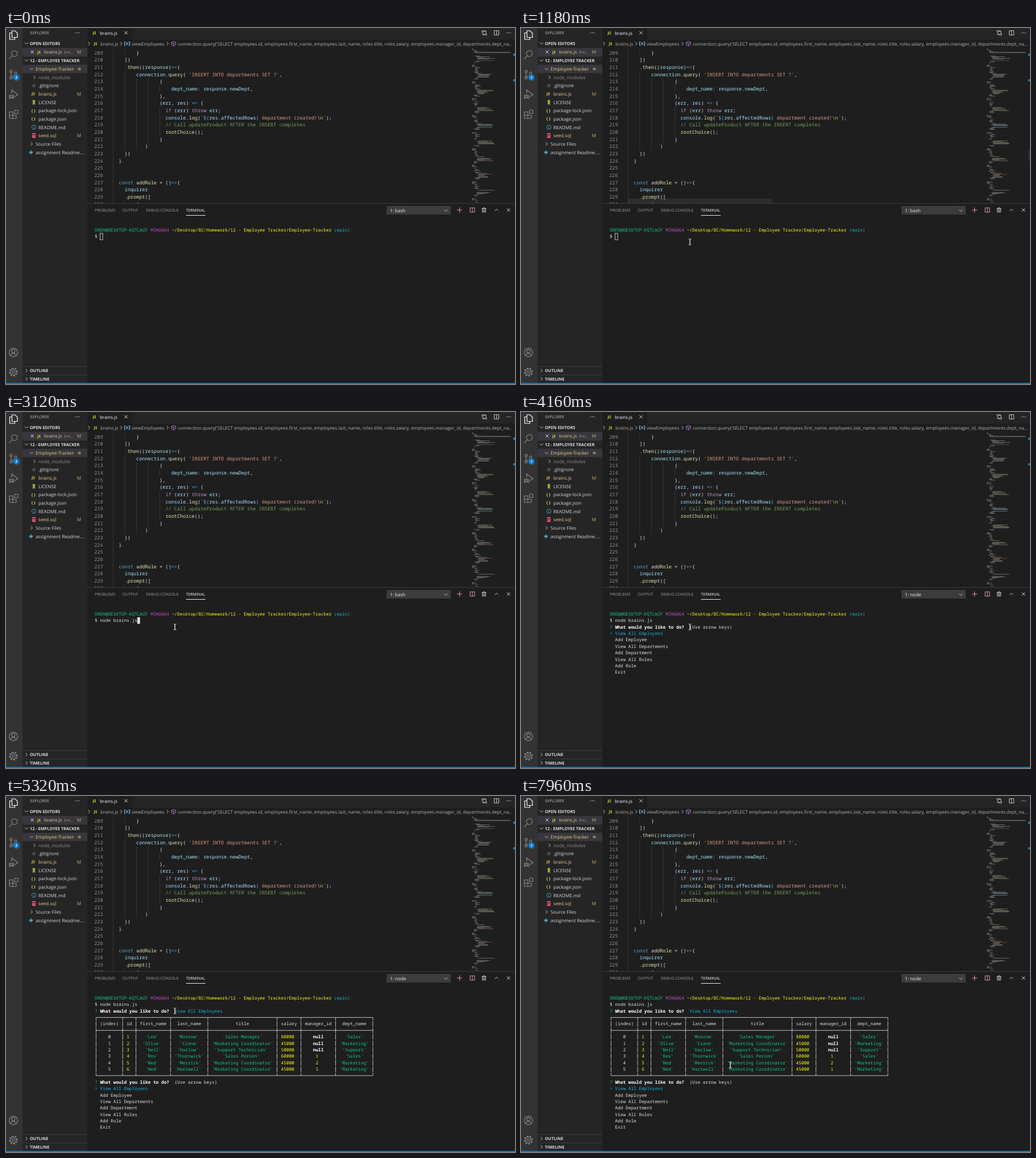
An HTML page that plays this animation: 895 by 626 pixels, repeating every 8 s.

```html
<!DOCTYPE html>
<html lang="en">
<head>
<meta charset="utf-8">
<title>Employee Tracker</title>
<style>
html, body { margin: 0; width: 100%; height: 100%; overflow: hidden; background: #1e1e1e; }
svg { display: block; width: 100%; height: 100%; }
text { font-family: "Open Sans", "Noto Sans", sans-serif; white-space: pre; text-rendering: geometricPrecision; }
.mono { font-family: "Noto Sans Mono", "DejaVu Sans Mono", monospace; font-weight: 500; }
</style>
</head>
<body>
<svg id="stage" viewBox="0 0 895 626"></svg>
<script>
const stage = document.getElementById('stage');

// One-letter colour keys for coloured runs of text: "bname|d(" and so on
const C = {
  d: '#dcdcdc', b: '#a4e2ff', y: '#e4e4b2', o: '#d89a80', k: '#5aa4e0', p: '#cd8cc6', c: '#6fa05a', e: '#dfc285',
  T: '#e0e0e0', G: '#0fcb83', M: '#cc44cc', Y: '#fafa14', A: '#14b4e0', W: '#ffffff'
};
const text = (x, y, s, size, fill = '#d6d6d6', more = '') =>
  `<text x="${x}" y="${y}" font-size="${size}" fill="${fill}" ${more}>${s}</text>`;
const rect = (x, y, w, h, fill, more = '') =>
  `<rect x="${x}" y="${y}" width="${w}" height="${h}" fill="${fill}" ${more}/>`;
const dot = (x, y, r, fill) => `<circle cx="${x}" cy="${y}" r="${r}" fill="${fill}"/>`;
const icon = (x, y, d, color = '#c5c5c5', w = 1, more = '') =>
  `<path transform="translate(${x} ${y})" d="${d}" fill="none" stroke="${color}" stroke-width="${w}" ${more}/>`;
const group = (id, s) => `<g id="${id}" display="none">${s}</g>`;
const spans = s => s.split('|').map(p =>
  `<tspan fill="${C[p[0]]}"${p[0] === 'W' ? ' font-weight="700"' : ''}>${p.slice(1)}</tspan>`).join('');

const bold = 'font-weight="700"', mono = 'class="mono"';
const ring = (r, cx = 0, cy = 0) => `M${cx - r} ${cy}a${r} ${r} 0 1 0 ${2 * r} 0a${r} ${r} 0 1 0 ${-2 * r} 0`;
const down = (x, y) => icon(x, y, 'M-3-1.5 0 1.5 3-1.5');
const right = (x, y) => icon(x, y, 'M-1.5-3 1.5 0-1.5 3');
const cross = (x, y) => icon(x, y, 'M-2.7-2.7 2.7 2.7M2.7-2.7-2.7 2.7', '#e0e0e0');
const split = (x, y, color) => icon(x, y, 'M-4-3.8h8v7.6h-8zM0-3.8v7.6', color);
const dots = (x, y) => [-3, 0, 3].map(i => dot(x + i, y, .8, '#c5c5c5')).join('');
const js = (x, y) => text(x, y + 2.5, 'JS', 6.6, '#e0dc3c', bold);

function activityBar() {
  const g = '#858585', w = 1.2;
  return rect(0, 0, 29, 626, '#333333')
    + icon(13, 12.5, 'M-2.5-7.5h5.5l4 4v7.5h-9.5zM-2.5-4h-4v11.5h9v-4', '#fff', w)
    + icon(13, 47, ring(5.2, 1.8, -2) + 'M-2 2-7.5 7.5', g, w)
    + icon(12.5, 82, ring(2.2, -3.5, -5.5) + ring(2.2, -3.5, 5.5) + ring(2.2, 4.5, -2.5) + 'M-3.5-3v6M4.5 0q0 3-7 3', g, w)
    + dot(18.3, 87, 5.6, '#007acc') + text(16.5, 89.3, '2', 6.2, '#fff', bold)
    + icon(13, 117, 'M-3-2v-6L8 0 0 5.5' + ring(2.9, -3.5, 3.8) + 'M-8 1l2 1.5M1 1l-2 1.5M-8 7.5l2-1.5M1 7.5l-2-1.5M-8 4h7.5', g, w)
    + icon(13, 152, 'M-7-4.5h6v11.5h-6zM-7 1.5h12v5.5h-12zM2-7.5h6v6h-6z', g, w)
    + icon(13, 570.5, ring(7.4) + ring(2.8, 0, -2) + 'M-5 5.3q5-8 10 0', g, w)
    + icon(13, 605, ring(2.2) + ring(5.4), g, w)
    + icon(13, 605, ring(6.8), g, 2, 'stroke-dasharray="2.67"');
}

function sideBar() {
  const mod = '#ebc88a', blue = '#519aba';
  const rowY = i => 72 + i * 14.65;
  const label = (i, x, s, fill) => text(x, rowY(i) + 3, s, 8.2, fill);
  const changed = y => text(124.7, y + 3, 'M', 8.2, '#cfab73');
  const head = (y, s, arrow) => arrow(36, y) + text(42, y + 2.7, s, 7.35, '#dcdcdc', bold);
  const braces = i => text(44.5, rowY(i) + 2.4, '{ }', 7, '#d8d842', bold);
  let s = rect(29, 0, 114, 626, '#252526') + text(42.5, 11, 'EXPLORER', 6.95, '#c4c4c4') + dots(125.5, 8.5)
    + rect(29, 34.9, 114, 14.6, '#37373d') + rect(29, 64.7, 114, 14.6, '#37373d');
  for (const y of [49.5, 595, 609.6]) s += rect(29, y, 114, .7, '#47474a');
  s += head(27, 'OPEN EDITORS', down) + head(57, '12 - EMPLOYEE TRACKER', down)
    + head(602.5, 'OUTLINE', right) + head(617, 'TIMELINE', right);
  s += cross(46, 42) + js(55, 42) + text(67, 45, 'brains.js', 8.05, mod) + text(102, 45, 'Em...', 7.3, '#a89270') + changed(42);
  return s + down(45, 72) + label(0, 52, 'Employee-Tracker', mod) + dot(129, 72, 2.6, '#8a7a60')
    + right(50, rowY(1)) + label(1, 57, 'node_modules', '#8c8c8c')
    + rect(46.5, rowY(2) - 2.5, 5, 5, '#41535b') + label(2, 57, '.gitignore')
    + js(45, rowY(3)) + label(3, 57, 'brains.js', mod) + changed(rowY(3))
    + icon(49, rowY(4), ring(1.5, 0, -2) + 'M-.8 0-1.5 4M.8 0 1.5 4', '#d8d842', 1.4) + label(4, 57, 'LICENSE')
    + braces(5) + label(5, 57, 'package-lock.json')
    + braces(6) + label(6, 57, 'package.json')
    + icon(49, rowY(7), ring(3.7) + 'M0-2.2v1M0-.3v2.7', blue, .9) + label(7, 57, 'README.md')
    + icon(49, rowY(8), 'M-3-2.5q3-2 6 0M-3-.2q3 1.5 6 0M-3 2.5q3 1.5 6 0', '#f55385', 2) + label(8, 57, 'seed.sql', mod) + changed(rowY(8))
    + right(45, rowY(9)) + label(9, 52, 'Source Files')
    + icon(44, rowY(10), 'M0-3.5v3.5M-2.5 0h5L0 2.5z', blue, 1.8) + label(10, 52, 'assignment Readme....');
}

// Repeating functions: a short prompt, an indented query, then closing braces and a gap
function minimap() {
  let seed = 11, s = '';
  const rnd = () => (seed = seed * 16807 % 2147483647) / 2147483647;
  const tints = ['#9cdcfe', '#d4d4d4', '#ce9178', '#dcdcaa', '#d4d4d4'];
  for (let i = 0; i < 204; i++) {
    const k = i % 22, query = k > 10 && k < 17;
    const indent = query ? 8 + 4 * rnd() : k < 3 || k > 19 ? 0 : 3 + 4 * rnd();
    const width = i === 5 || i === 6 ? 64 : query ? 8 + 22 * rnd() : 2 + 8 * rnd();
    const tint = tints[Math.floor(rnd() * 5)];
    if (k < 20 && rnd() > .12)
      s += rect((819 + indent).toFixed(1), (35.5 + i * 1.333).toFixed(1), width.toFixed(1), .8, tint, 'opacity=".5"');
  }
  return s + rect(892, 45, 3, 4, '#1b81a8') + rect(892, 90, 3, 4, '#1b81a8');
}

const lines = [
  [6, "d}"], [2, "d])"], [2, "d.|ythen|d((|bresponse|d)|k=>|d{"],
  [6, "bconnection|d.|yquery|d( |o'INSERT INTO departments SET ?'|d,"],
  [14, "d{"], [18, "bdept_name:|d |bresponse|d.|bnewDept|d,"], [14, "d},"],
  [14, "d(|berr|d, |bres|d) |k=>|d {"], [16, "pif|d (|berr|d) |pthrow|d |berr|d;"],
  [16, "bconsole|d.|ylog|d(|o`|k${|bres|d.|baffectedRows|k}|o department created!|e\\n|o`|d);"],
  [16, "c// Call updateProduct AFTER the INSERT completes"], [16, "yrootChoice|d();"],
  [14, "d}"], [9, "d)"], [2, "d})"], [0, "d}"], [0, "d"], [0, "d"],
  [0, "kconst|d |yaddRole|d = ()|k=>|d{"], [2, "binquirer"], [2, "d.|yprompt|d(["], [6, "d{"]
];

function editor() {
  const crumbs = '#b2b2b2', pitch = 12.675, adv = 5.135;
  let s = rect(143, 0, 752, 626, '#1e1e1e') + rect(222, 0, 673, 20.2, '#252526')
    + js(152.5, 8.5) + text(165, 11.5, 'brains.js', 7.9, '#fff') + cross(211, 8.5)
    + icon(841, 8.5, ring(1.4, -3, -2.8) + ring(1.4, 3, 2.8) + 'M-3-1v4h3M3 1v-4h-3M-1 1.5 .5 3-1 4.5M1-4.5-.5-3 1-1.5')
    + split(862.5, 8.5) + dots(884, 8.5);
  s += right(146, 27.5) + js(154.5, 27.5) + text(166, 30.5, 'brains.js', 8.05, crumbs) + right(202.5, 27.5)
    + icon(213, 27.5, 'M-2.5-3h-2v6h2M2.5-3h2v6h-2' + ring(1.5), '#75beff', 1.1)
    + text(221, 30.5, 'viewEmployees', 8.05, crumbs) + right(284, 27.5)
    + icon(294.5, 27.5, 'M0-4 3.8-2v4L0 4-3.8 2v-4zM-3.8-2 0 0 3.8-2M0 0v4', '#b180d7', .9)
    + text(302, 30.5, "connection.query('SELECT employees.id, employees.first_name, employees.last_name, roles.title, roles.salary, employees.manager_id, departments.dept_na...", 8.07, crumbs);
  lines.forEach(([col, code], i) => {
    const y = 46.5 + i * pitch;
    for (let c = -2; c < col || c < 0; c += 4) s += rect(198.3 + c * adv, y - 9.4, .7, pitch, '#404040');
    s += text(155.2, y, 209 + i, 8.558, '#8c8c8c', mono) + text(198.3 + col * adv, y, spans(code), 8.558, C.d, mono);
  });
  return s + minimap()
    + group('bars', rect(188, 300, 253.5, 8, '#797979', 'opacity=".55"') + rect(891.5, 214, 3.5, 19, '#797979', 'opacity=".55"'));
}

function panel() {
  const tab = (x, s, fill = '#9c9c9c') => text(x, 323, s, 7, fill);
  return rect(143, 308, 752, 318, '#1e1e1e') + rect(143, 308, 752, .8, '#444')
    + tab(156, 'PROBLEMS') + tab(205, 'OUTPUT') + tab(246, 'DEBUG CONSOLE') + tab(316.5, 'TERMINAL', '#f4f4f4')
    + rect(316.5, 329, 34.5, 1, '#e7e7e7')
    + rect(669, 313, 113, 15, '#3c3c3c') + text(675, 323.8, '', 8.2, '#f0f0f0', 'id="shell"') + down(773.5, 321)
    + icon(797.5, 320, 'M-4.5 0h9M0-4.5v9', '#e09a9a') + split(820, 320, '#d79aa2')
    + icon(840.5, 320, 'M-4-2.5h8M-1.5-2.5v-1.3h3v1.3M-2.8-2.5v6.3h5.6v-6.3M-1-1v3.5M1-1v3.5')
    + icon(862.5, 320, 'M-3 1.5 0-1.5 3 1.5') + cross(883.5, 320);
}

// Terminal grid
const ADV = 4.68, ROW = 11.37;
const colX = c => 156 + c * ADV, rowTop = r => 349.6 + r * ROW;
const term = (row, col, s, more = '') => text(colX(col), rowTop(row) + 8.4, spans(s), 7.8, C.T, mono + more);

const choices = ['View All Employees', 'Add Employee', 'View All Departments', 'Add Department', 'View All Roles', 'Add Role', 'Exit'];
const question = row => term(row, 0, 'G?|T |WWhat would you like to do?');
const menu = row => term(row, 30, 'T(Use arrow keys)') + term(row + 1, 0, 'A&gt;')
  + choices.map((s, i) => term(row + 1 + i, 2, (i ? 'T' : 'A') + s)).join('');

const table = [
  "(index),id,first_name,last_name,title,salary,manager_id,dept_name",
  "0,1,'Lea','Morrow','Sales Manager',80000,null,'Sales'",
  "1,2,'Olive','Crane','Marketing Coordinator',45000,null,'Marketing'",
  "2,3,'Neil','Harlow','Support Technician',50000,null,'Support'",
  "3,4,'Rex','Thornwick','Sales Person',60000,1,'Sales'",
  "4,5,'Ned','Merrick','Marketing Coordinator',45000,2,'Marketing'",
  "5,6,'Ned','Hartwell','Marketing Coordinator',45000,1,'Marketing'"
].map(s => s.split(','));
const widths = [9, 4, 12, 13, 25, 8, 12, 13];

function drawTable() {
  const edges = widths.reduce((a, w) => [...a, a[a.length - 1] + w + 1], [0]);
  const mid = r => rowTop(r) + ROW / 2;
  let s = '', d = '';
  table.forEach((cells, i) => cells.forEach((v, j) => {
    const key = !i || !j ? 'T' : v[0] === "'" ? 'G' : v === 'null' ? 'W' : 'Y';
    s += term(i ? i + 5 : 4, edges[j] + 1 + Math.floor((widths[j] - v.length) / 2), key + v);
  }));
  for (const r of [3, 5, 12]) d += `M${colX(.5)} ${mid(r)}H${colX(104.5)}`;
  for (const e of edges) for (let r = 3; r <= 12; r++)
    d += `M${colX(e + .5)} ${mid(r) - (r > 3 ? 5 : 0)}V${mid(r) + (r < 12 ? 5 : 0)}`;
  return s + icon(0, 0, d, '#d4d4d4', .9);
}

const terminal = () =>
  term(0, 0, 'GOREN@DESKTOP-KQTLWZF|T |MMINGW64|T |Y~/Desktop/BC/Homework/12 - Employee Tracker/Employee-Tracker|T |A(main)')
  + term(1, 0, 'T$') + term(1, 2, 'T', ' id="typed"')
  + group('ask', question(2)) + group('menu', menu(2)) + group('answer', term(2, 30, 'AView All Employees'))
  + group('result', drawTable() + question(13) + menu(13))
  + rect(0, 0, ADV, 11.4, '#e5e5e5', 'id="block" stroke="#d4d4d4" stroke-width=".9"');

const pointer = () => group('beam', icon(0, 0, 'M-2.5-5.3q2.5 0 2.5 1.3v8q0 1.3-2.5 1.3M2.5-5.3q-2.5 0-2.5 1.3v8q0 1.3 2.5 1.3', '#e8e8e8', .9))
  + group('hand', '<path d="M-2.5-6q1.5-1.5 2.5 0v4l5.5 1.2q1.3.5 1.2 2L5.5 7h-6.5l-4.5-5.5q.3-1.5 3 .3z" fill="#fff" stroke="#000" stroke-width=".8"/>');

stage.innerHTML = editor() + panel() + activityBar() + sideBar()
  + rect(0, 624, 895, 2, '#007acc') + terminal() + pointer();

// Keys: [time, value...]; each holds until the next
const typing = [[0, 0], [1860, 1], [1950, 2], [2090, 4], [2180, 5], [2260, 6], [2340, 7], [2510, 8], [2570, 10],
  [2740, 11], [2980, 12], [3050, 13], [3120, 14]];
const path = [[0, -50, -50], [220, 322, 616], [300, 312, 500], [380, 305, 380], [460, 300, 276], [700, 292, 298],
  [780, 284, 321], [850, 288, 345], [930, 292, 360], [1020, 295, 370], [1180, 297, 376], [1340, 297, 378],
  [7340, 295, 386], [7420, 290, 400], [7500, 285, 414], [7570, 282, 422], [7810, 310, 438], [7890, 345, 460], [7960, 368, 473]];
const hold = (keys, t) => keys.filter(k => k[0] <= t).pop();
const el = id => document.getElementById(id);
const show = (id, on) => el(id).setAttribute('display', on ? 'inline' : 'none');
const typed = el('typed').firstChild;

function frame() {
  const t = performance.now() % 8000;
  const count = hold(typing, t)[1];
  typed.textContent = 'node brains.js'.slice(0, count);
  el('shell').textContent = t < 3760 ? '1: bash' : '1: node';

  show('ask', t >= 4160);
  show('menu', t >= 4160 && t < 5250);
  show('answer', t >= 5250);
  show('result', t >= 5320);

  const [row, col] = t < 3690 ? [1, 2 + count] : t < 4160 ? [2, 0] : [3, 0];
  const block = el('block'), focused = t >= 1340;
  show('block', t < 4160 || (t >= 5250 && t < 5320));
  block.setAttribute('transform', `translate(${colX(col)} ${rowTop(row)})`);
  block.setAttribute('fill', focused ? '#e5e5e5' : 'none');
  block.setAttribute('stroke-opacity', focused ? 0 : 1);

  show('bars', t >= 380 && t < 1340);
  el('bars').setAttribute('opacity', Math.min(1, (1340 - t) / 490));

  const [, x, y] = hold(path, t), overTabs = y > 309 && y < 335;
  show('hand', overTabs);
  show('beam', !overTabs);
  for (const id of ['hand', 'beam']) el(id).setAttribute('transform', `translate(${x} ${y})`);
  requestAnimationFrame(frame);
}
frame();
</script>
</body>
</html>
```
